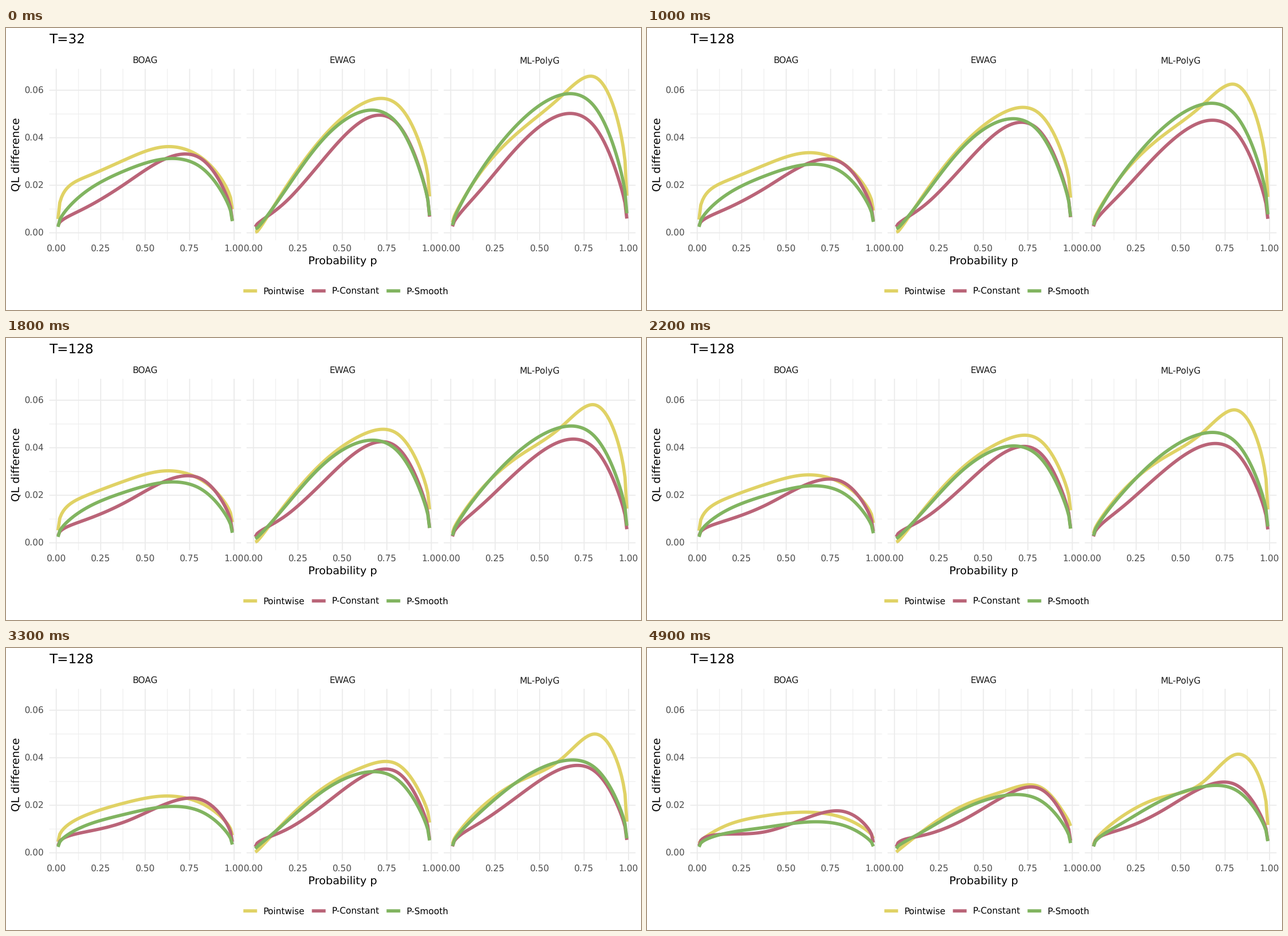
Recreate the animation shown at these times as a matplotlib script. Size 1122 by 499 pixels, loop 8000 ms.

```python
import numpy as np
import matplotlib.pyplot as plt
from matplotlib.animation import FuncAnimation

W, H, DPI = 1122, 499, 100
FRAMES, INTERVAL = 80, 100
HOLD, STEPS = 4, 45           # frames before the blend starts, frames it takes

plt.rcParams["font.family"] = "DejaVu Sans"
plt.rcParams["text.hinting"] = "none"

PANEL_W, PITCH, LEFT = 338.8, 348.5, 76.5
TOP, BOTTOM = 72.2, 375.6
UNIT_X, UNIT_Y, ZERO_Y = PANEL_W / 1.078, 4205, 362.4

METHODS = {"Pointwise": "#E0D265", "P-Constant": "#BA6478", "P-Smooth": "#81B460"}
GRID = "#EBEBEB"

# Key heights in thousandths, (start, end) for each method
PANELS = {
    "BOAG": [
        ([5.8, 18.6, 24.4, 30.9, 36.2, 32.2, 21.1, 9.9], [4, 7.3, 12.4, 15.7, 17.1, 15.1, 10.1, 6]),
        ([3, 6.5, 11.7, 20.8, 31, 31.6, 18.4, 5.2], [3, 6.9, 7.9, 9, 14.5, 17.6, 12, 4.3]),
        ([2.5, 9.8, 18.8, 26.3, 31.1, 28, 15.8, 4.9], [2.5, 5.9, 8.7, 10.8, 12.9, 11.9, 7, 2.7]),
    ],
    "EWAG": [
        ([.3, 4.5, 20.6, 40.3, 54.2, 54.2, 36, 15.3], [.3, 3.3, 11.1, 20, 25.8, 28.1, 18, 11.3]),
        ([2.5, 5.9, 14, 30.7, 47, 46.2, 25.3, 6.8], [2.5, 5.7, 8, 14, 23.5, 27.3, 16.5, 5.1]),
        ([1.8, 5.3, 19.6, 39.3, 51, 46.3, 24.8, 7.2], [1.8, 4.7, 10.4, 18.6, 24, 22.6, 12.8, 4.1]),
    ],
    "ML-PolyG": [
        ([4.4, 12.6, 28, 43, 56.6, 65.7, 46.5, 15.6], [3.4, 8.6, 16.5, 23.3, 28.8, 41.3, 32, 11.7]),
        ([2.7, 8.7, 20.3, 37.3, 49.4, 45, 23.2, 6], [2.7, 7.2, 10.6, 17.5, 27, 28.8, 17.1, 5.1]),
        ([3.2, 12.2, 29, 46.8, 57.8, 53.4, 30.2, 8.2], [2.7, 7.4, 13.5, 21.9, 27.6, 26.6, 15.6, 4.9]),
    ],
}
PROB = np.linspace(.01, .99, 99)


def spline(keys):
    """Cubic spline at PROB; keys are even in angle, so they crowd at both ends."""
    y = np.array(keys) / 1000
    n = len(y) - 1
    a = 4 * np.eye(n - 1) + np.eye(n - 1, k=1) + np.eye(n - 1, k=-1)
    a[0, 0] = a[-1, -1] = 5
    m = np.pad(np.linalg.solve(a, np.diff(y, 2)), 1, mode="edge")
    u = n / np.pi * np.arccos(np.clip((.5 - PROB) / .49, -1, 1))
    k = np.minimum(u.astype(int), n - 1)
    t = u - k
    s = 1 - t
    return s * y[k] + t * y[k + 1] + (s**3 - s) * m[k] + (t**3 - t) * m[k + 1]


def px(panel, p):
    return LEFT + panel * PITCH + (p + .039) * UNIT_X


def py(v):
    return ZERO_Y - v * UNIT_Y


fig = plt.figure(figsize=(W / DPI, H / DPI), dpi=DPI, facecolor="white")
ax = fig.add_axes([0, 0, 1, 1])
ax.set(xlim=(0, W), ylim=(H, 0))
ax.axis("off")


def line(x, y, color, width=5.8):
    """Line with its width in pixels."""
    return ax.plot(x, y, color=color, lw=width * 72 / DPI, snap=False,
                   solid_capstyle="butt", solid_joinstyle="round")[0]


def text(x, y, s, size=11.2, color="black", ha="left", **kw):
    return ax.text(x, y, s, fontsize=size, color=color, ha=ha, va="baseline", **kw)


def draw_grid(panel):
    left = LEFT + panel * PITCH
    for width, xs, ys in [(.94, np.arange(.125, 1, .25), np.arange(.01, .06, .02)),
                          (1.89, np.arange(0, 1.1, .25), np.arange(0, .07, .02))]:
        for v in ys:
            line([left, left + PANEL_W], [py(v)] * 2, GRID, width)
        for p in xs:
            line([px(panel, p)] * 2, [TOP, BOTTOM], GRID, width)


curves = []
for i, (name, rows) in enumerate(PANELS.items()):
    draw_grid(i)
    text(LEFT + i * PITCH + PANEL_W / 2, 62.7, name, color="#1A1A1A", ha="center")
    for p in np.arange(0, 1.1, .25):
        text(px(i, p), 395.7, f"{p:.2f}", color="#4D4D4D", ha="center")
    for color, keys in zip(METHODS.values(), rows):
        start, end = map(spline, keys)
        curves.append((line(px(i, PROB), py(start), color), start, end))

for v in np.arange(0, .07, .02):
    text(67.6, py(v) + 5.7, f"{v:.2f}", color="#4D4D4D", ha="right")

title = text(LEFT, 27, "T=32", 16.8)
text(595, 418, "Probability p", 14, ha="center")
text(23.5, 224, "QL difference", 14, ha="center", rotation=90, rotation_mode="anchor")

for x, (name, color) in zip((419.4, 540.5, 672.4), METHODS.items()):
    line([x, x + 24.2], [465.2] * 2, color)
    text(x + 35, 470.9, name)


def update(frame):
    t = np.clip((frame - HOLD) / STEPS, 0, 1)
    title.set_text("T=128" if t > 0 else "T=32")
    for curve, start, end in curves:
        curve.set_ydata(py(start + (end - start) * t))
    return [title] + [c[0] for c in curves]


anim = FuncAnimation(fig, update, frames=FRAMES, interval=INTERVAL,
                     repeat=True, repeat_delay=0, blit=False)
plt.show()
```
